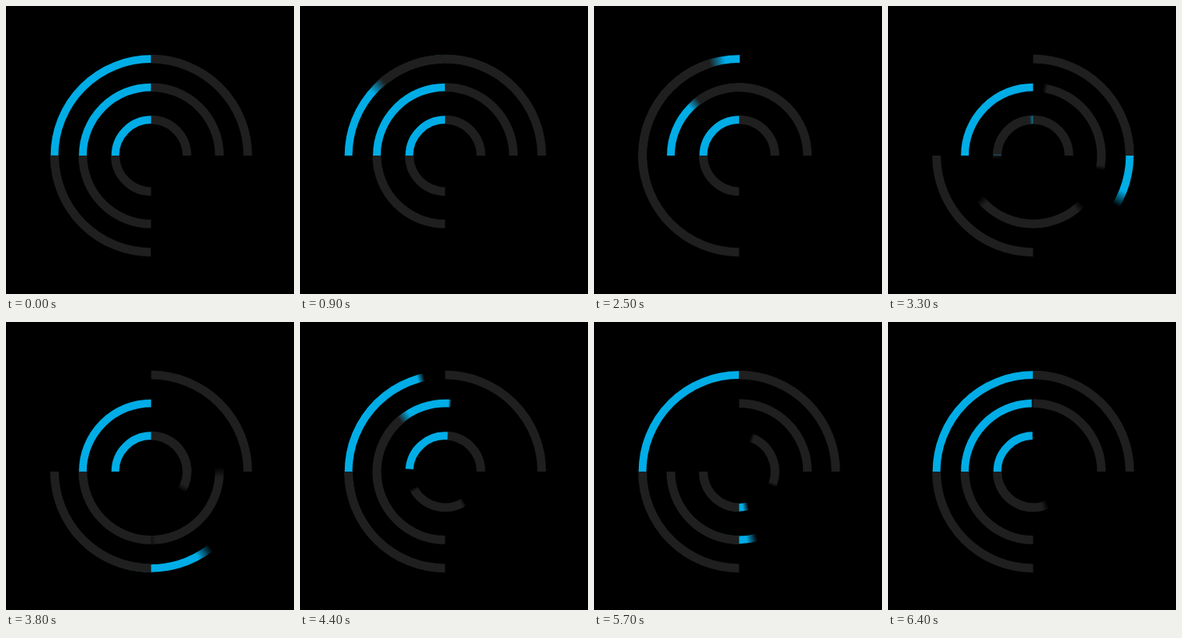
Write an HTML page with a canvas that moves like this. It is 360 px wide and 360 px high and loops after 6.5 s.

```html
<!DOCTYPE html>
<html lang="en">
<head>
<meta charset="utf-8">
<title>Rotating arcs</title>
<style>
  html, body { margin: 0; height: 100%; overflow: hidden; background: #000; }
  canvas { display: block; }
</style>
</head>
<body>
<canvas id="stage" width="360" height="360"></canvas>
<script>
const ctx = document.getElementById('stage').getContext('2d');
const CENTER_X = 181.4, CENTER_Y = 187;
const LOOP = 6500, STEP = 100;   // the animation plays at ten pictures a second
const TURN = 2200;               // duration of one full turn of an arc
const SHUTTER = 41;              // exposure time of the motion blur
const QUARTER = Math.PI / 2;

const BLUE = { color: '#00ade6', width: 9.7 };
const GRAY = { color: '#1f1f1f', width: 10.8 };

const topLeft = start => ({ ...BLUE, home: Math.PI, start });
const topRight = start => ({ ...GRAY, home: -QUARTER, start });
const bottomLeft = start => ({ ...GRAY, home: QUARTER, start });

// Arcs of each ring from back to front, with the time each starts to turn.
const rings = [
  { radius: 120.8, arcs: [topLeft(2465), topRight(1077), bottomLeft(-18)] },
  { radius: 85.4, arcs: [topLeft(4266), topRight(3080), bottomLeft(1568)] },
  { radius: 44.8, arcs: [topRight(5378), topLeft(4265), bottomLeft(2588)] }
];

function turned(arc, time) {
  const u = Math.min(1, Math.max(0, (time - arc.start) / TURN));
  return 2 * Math.PI * u * u * (3 - 2 * u);
}

function drawArc(radius, arc, time) {
  const from = arc.home + turned(arc, time - SHUTTER / 2);
  const to = arc.home + turned(arc, time + SHUTTER / 2);
  const blur = to - from;

  ctx.strokeStyle = arc.color;
  if (blur > 0.002) {
    // Both ends fade over the angle swept during the exposure.
    const fade = ctx.createConicGradient(from, CENTER_X, CENTER_Y);
    const stop = (angle, color) => fade.addColorStop(angle / (2 * Math.PI), color);
    const clear = arc.color + '00';
    stop(0, clear);
    stop(blur, arc.color);
    stop(QUARTER, arc.color);
    stop(QUARTER + blur, clear);
    ctx.strokeStyle = fade;
  }
  ctx.lineWidth = arc.width;
  ctx.beginPath();
  ctx.arc(CENTER_X, CENTER_Y, radius, from, to + QUARTER);
  ctx.stroke();
}

function render() {
  const time = Math.floor((performance.now() + 2) / STEP) * STEP % LOOP;
  ctx.fillStyle = '#000';
  ctx.fillRect(0, 0, 360, 360);
  for (const { radius, arcs } of rings) {
    for (const arc of arcs) drawArc(radius, arc, time);
  }
  requestAnimationFrame(render);
}
render();
</script>
</body>
</html>
```
